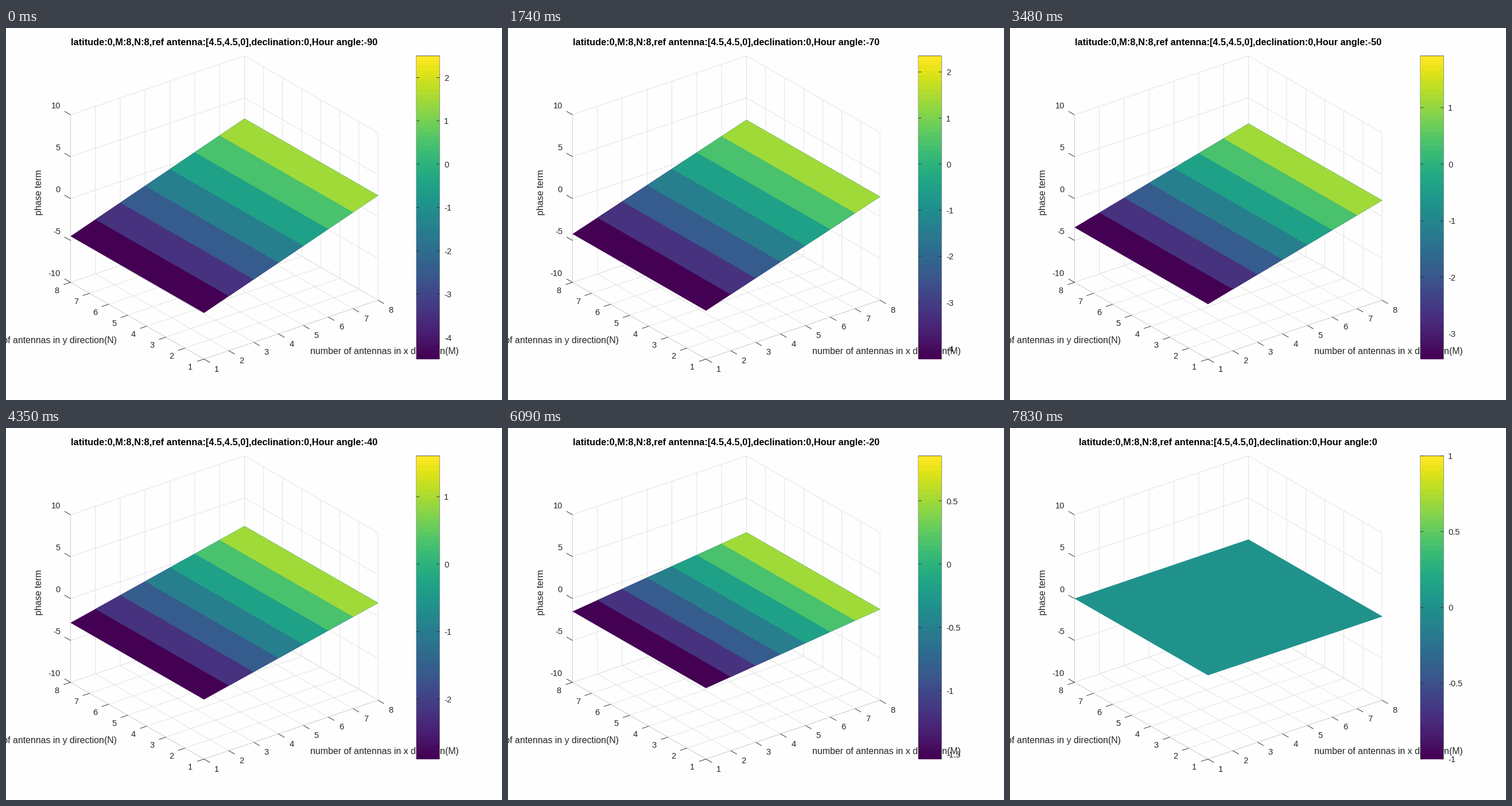
Animation of 864x648 px, one loop 8000 ms. Source, as a matplotlib script:

```python
import math

import numpy as np
import matplotlib.pyplot as plt
from matplotlib.animation import FuncAnimation
from matplotlib.collections import LineCollection, PolyCollection

W, H, DPI = 864, 648, 72
LOOP, INTERVAL, HOLD = 8000, 40, 870
DARK, GRID, EDGE = "#262626", "#e0e0e0", "#d3cccc"
MAX_TICKS = 10

# Axes box and colour bar in pixels
LEFT, RIGHT, TOP, BOTTOM = 0.13 * W, 0.75 * W, 0.075 * H, 0.89 * H
BAR_L, BAR_R = 0.8275 * W, 0.874 * W

AZIMUTH, ELEVATION = math.radians(37.5), math.radians(30)
COS_A, SIN_A = math.cos(AZIMUTH), math.sin(AZIMUTH)
COS_E, SIN_E = math.cos(ELEVATION), math.sin(ELEVATION)
SCALE_X = (RIGHT - LEFT) / (COS_A + SIN_A)
SCALE_Y = (BOTTOM - TOP) / ((COS_A + SIN_A) * SIN_E + COS_E)

plt.rcParams["font.family"] = "Liberation Sans"
cmap = plt.get_cmap("viridis", 64)

fig = plt.figure(figsize=(W / DPI, H / DPI), dpi=DPI, facecolor="#fefefe")
ax = fig.add_axes([0, 0, 1, 1])
ax.axis("off")


def project(x, y, z):
    """Orthographic view of the unit cube, stretched to the axes box."""
    u, v, w = (x - 1) / 7, (y - 1) / 7, (z + 10) / 20
    px = LEFT + SCALE_X * (u * COS_A + (1 - v) * SIN_A)
    py = BOTTOM - SCALE_Y * ((u * SIN_A + v * COS_A) * SIN_E + w * COS_E)
    return px, py


def segment(a, b):
    return [project(*a), project(*b)]


def add_lines(lines, color, zorder, width=0.9):
    art = LineCollection(lines, colors=color, linewidths=width, zorder=zorder)
    art.set_snap(False)
    return ax.add_collection(art, autolim=False)


def label(x, y, s, size=14.6, color=DARK, zorder=2, **kw):
    return ax.text(x, y, s, fontsize=size, color=color, zorder=zorder, **kw)


def draw_axes():
    grid, ticks = [], []
    for k in range(1, 9):
        grid += [segment((k, 1, -10), (k, 8, -10)),
                 segment((1, k, -10), (8, k, -10)),
                 segment((k, 8, -10), (k, 8, 10)),
                 segment((8, k, -10), (8, k, 10))]
        x, y = project(k, 1, -10)
        ticks.append([(x, y), (x + 10.4, y + 6)])
        label(x + 22.5, y + 22, str(k), ha="center")
        x, y = project(1, k, -10)
        ticks.append([(x, y), (x - 12, y + 4)])
        label(x - 23.5, y + 18.5, str(k), ha="center")
    for z in range(-10, 11, 5):
        grid += [segment((1, 8, z), (8, 8, z)), segment((8, 1, z), (8, 8, z))]
        x, y = project(1, 8, z)
        ticks.append([(x, y), (x - 10.4, y - 6)])
        label(95, y - 11, str(z), ha="right")
    edges = [segment((1, 1, -10), (8, 1, -10)),
             segment((1, 1, -10), (1, 8, -10)),
             segment((1, 8, -10), (1, 8, 10))]
    add_lines(grid, GRID, 0)
    add_lines(edges, EDGE, 0.5)
    add_lines(ticks, DARK, 2)
    label(530.5, 568, "number of antennas in x direction(M)", 15.9)
    label(193, 549, "number of antennas in y direction(N)", 15.9, ha="right")
    label(65, 286.5, "phase term", 15.9, rotation=90, ha="right", va="center")


draw_axes()

title = label((LEFT + RIGHT) / 2, 30, "", 16.37, "black", ha="center",
              weight="bold")

surface = PolyCollection([], linewidths=0, zorder=1)
ax.add_collection(surface, autolim=False)

# The bar covers the inner half of its thin outline
add_lines([[(BAR_L, TOP), (BAR_R, TOP), (BAR_R, BOTTOM), (BAR_L, BOTTOM),
            (BAR_L, TOP)]], DARK, 2.5, 0.7)
ax.imshow(np.arange(63, -1, -1).reshape(-1, 1), cmap=cmap, vmin=0, vmax=63,
          aspect="auto", interpolation="nearest", origin="upper", zorder=3,
          extent=(round(BAR_L), round(BAR_R), round(BOTTOM), round(TOP)))
bar_ticks = add_lines([], DARK, 4)
bar_labels = [label(763, 0, "", zorder=4) for _ in range(MAX_TICKS)]

ax.set_xlim(0, W)
ax.set_ylim(H, 0)


def tick_step(lo, hi):
    raw = (hi - lo) / 5
    power = 10 ** math.floor(math.log10(raw))
    m = raw / power
    for limit, nice in ((2, 1), (10, 2), (50, 5)):
        if m < math.sqrt(limit):
            return nice * power
    return 10 * power


def draw_surface(slope):
    """Each strip runs on to the far edge; the next one covers the rest."""
    quads, colors = [], []
    far = slope * 2.5
    for j in range(7):
        x = j + 1
        z = slope * (x - 5.5)
        quads.append([project(x, 1, z), project(8, 1, far),
                      project(8, 8, far), project(x, 8, z)])
        colors.append(cmap(64 * j // 7 if slope else 32))
    surface.set_verts(quads)
    surface.set_facecolor(colors)


def draw_bar(lo, hi):
    step = tick_step(lo, hi)
    first = math.ceil(lo / step - 1e-9)
    last = math.floor(hi / step + 1e-9)
    lines = []
    for text in bar_labels:
        text.set_text("")
    for text, n in zip(bar_labels, range(first, last + 1)):
        y = TOP + (hi - n * step) / (hi - lo) * (BOTTOM - TOP)
        lines += [[(BAR_L, y), (BAR_L + 5, y)],
                  [(BAR_R - 5, y), (BAR_R, y)]]
        text.set_text(f"{n * step:g}")
        text.set_y(y + 5.6)
    bar_ticks.set_segments(lines)


def update(i):
    step = (i * INTERVAL + 30) // HOLD
    angle = -90 + 10 * step
    slope = math.sin(math.radians(-angle)) if angle else 0
    title.set_text("latitude:0,M:8,N:8,ref antenna:[4.5,4.5,0],"
                   f"declination:0,Hour angle:{angle}")
    draw_surface(slope)
    if slope:
        draw_bar(-4.5 * slope, 2.5 * slope)
    else:
        draw_bar(-1, 1)
    return [title, surface, bar_ticks, *bar_labels]


anim = FuncAnimation(fig, update, frames=LOOP // INTERVAL, interval=INTERVAL,
                     init_func=lambda: update(0), repeat=True, repeat_delay=0,
                     blit=False)
plt.show()
```
